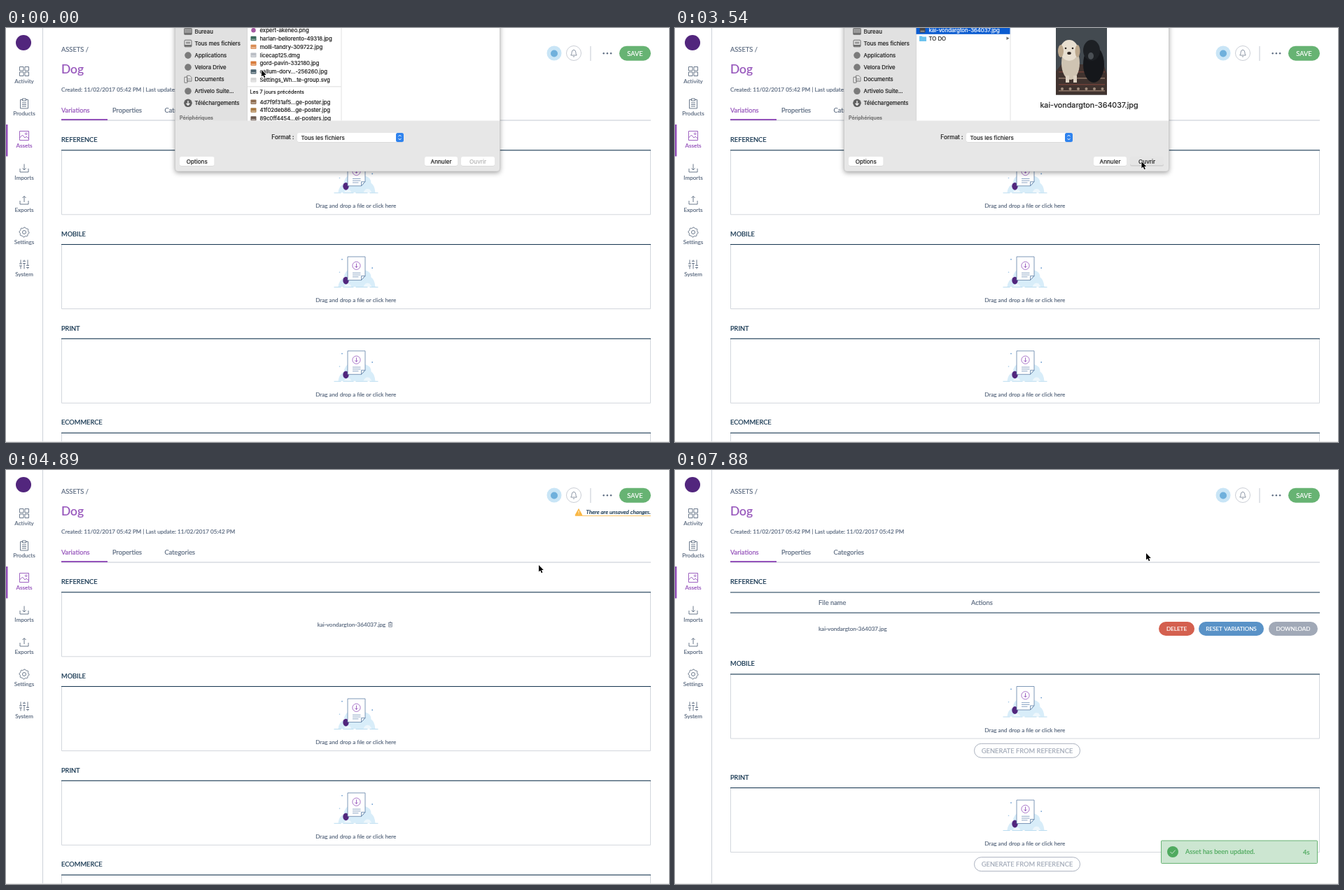
Write an HTML page with a canvas that moves like this. It is 947 px wide and 592 px high and loops after 8 s.

```html
<!DOCTYPE html>
<html lang="en">
<head>
<meta charset="utf-8">
<title>Asset upload</title>
<style>
html, body { margin: 0; width: 100%; height: 100%; overflow: hidden; background: #fff; }
canvas { display: block; width: 947px; height: 592px; }
</style>
</head>
<body>
<canvas id="stage"></canvas>
<script>
const W = 947, H = 592, LOOP = 8000;
const canvas = document.getElementById('stage');
const c = canvas.getContext('2d');
const dpr = window.devicePixelRatio || 1;
canvas.width = W * dpr;
canvas.height = H * dpr;

const NAVY = '#11324d', SLATE = '#5c6b80', PURPLE = '#9452ba', DEEP = '#52267d',
      GREEN = '#67b373', LINE = '#d3d7dd', ORANGE = '#f9b53f', GREY = '#a1a9b7',
      INK = '#1c1c1c';
const LATO = 'Lato, sans-serif', UI = 'Inter, sans-serif';
const FILE = 'kai-vondargton-364037.jpg';

// Cursor moves: start, time per step, steps, target x, target y
const MOVES = [
  [150, 172.5, 5, 309.5, 8],
  [1290, 150, 6, 430, 3],
  [2490, 150, 1, 463, 15],
  [2640, 150, 5, 678, 190],
  [3390, 150, 3, 665, 191],
  [4890, 150, 1, 761, 136],
  [5070, 150, 6, 893, 40],
  [7410, 156, 4, 673, 119]
];

function cursorAt(t) {
  let x = 365, y = 60;
  for (const [start, gap, n, tx, ty] of MOVES) {
    if (t < start) break;
    const p = Math.min(n, Math.floor((t - start) / gap) + 1) / n;
    const e = p * (2 - p);
    x += (tx - x) * e;
    y += (ty - y) * e;
  }
  return [x, y];
}

// Drawing helpers
function text(s, x, y, size, color, align = 'left', family = LATO, style = '') {
  c.font = `${style} ${size}px ${family}`;
  c.textAlign = align;
  c.textBaseline = 'alphabetic';
  c.fillStyle = c.strokeStyle = color;
  c.lineWidth = 0.2;
  c.lineJoin = 'round';
  c.fillText(s, x, y + size * 0.36);
  c.strokeText(s, x, y + size * 0.36); // slightly heavier, like desktop font smoothing
}
function rect(x, y, w, h, color) {
  c.fillStyle = color;
  c.fillRect(x, y, w, h);
}
function paint(fill, stroke, width = 1) {
  if (fill) { c.fillStyle = fill; c.fill(); }
  if (stroke) { c.strokeStyle = stroke; c.lineWidth = width; c.stroke(); }
}
function round(x, y, w, h, r, fill, stroke, width) {
  c.beginPath();
  c.roundRect(x, y, w, h, r);
  paint(fill, stroke, width);
}
function ellipse(x, y, rx, ry, fill, stroke, width) {
  c.beginPath();
  c.ellipse(x, y, rx, ry, 0, 0, Math.PI * 2);
  paint(fill, stroke, width);
}
const circle = (x, y, r, fill, stroke, width) => ellipse(x, y, r, r, fill, stroke, width);
function path(d, fill, stroke, width) {
  const p = new Path2D(d);
  if (fill) { c.fillStyle = fill; c.fill(p); }
  if (stroke) { c.strokeStyle = stroke; c.lineWidth = width || 1; c.stroke(p); }
}
function at(x, y, draw) {
  c.save();
  c.translate(x, y);
  draw();
  c.restore();
}

// Sidebar
const NAV = [
  ['Activity', col => {
    for (const x of [-6.5, 1]) for (const y of [-6.5, 1]) c.strokeRect(x, y, 5.5, 5.5);
  }],
  ['Products', col => {
    path('M-2.5-5.5H-5.5V7H5.5V-5.5H2.5M-2.5-7H2.5V-4H-2.5ZM-3-1H3M-3 1.5H3M-3 4H3', null, col, .9);
  }],
  ['Assets', col => {
    c.strokeRect(-6.5, -6.5, 13, 13);
    path('M-6.5 3L-2.5-1L1 3L3 1.2L6.5 4', null, col, .9);
    circle(2.7, -2.7, 1.3, null, col, .9);
  }],
  ['Imports', col => path('M-6 1V6H6V1M0-5.5V3M-2.5 .5L0 3L2.5 .5', null, col, .9)],
  ['Exports', col => path('M-6 1V6H6V1M0 3V-5.5M-2.5-3L0-5.5L2.5-3', null, col, .9)],
  ['Settings', col => {
    c.beginPath();
    for (let i = 0; i <= 32; i++) {
      const a = i * Math.PI / 16, r = i % 4 < 2 ? 7 : 6;
      c.lineTo(r * Math.cos(a), r * Math.sin(a));
    }
    paint(null, col, .9);
    circle(0, 0, 2.5, null, col, .9);
  }],
  ['System', col => path('M-5-6.5V-1M-5 2V6.5M0-6.5V-4.5M0-1.5V6.5M5-6.5V1.5M5 4.5V6.5M-7-1H-3M-7 2H-3M-2-4.5H2M-2-1.5H2M3 1.5H7M3 4.5H7', null, col, .9)]
];

function sidebar() {
  rect(52, 0, 1, 591, '#cdd2d9');
  circle(25, 21, 11, DEEP);
  rect(0, 138, 2.5, 45.5, PURPLE);
  NAV.forEach(([label, icon], i) => {
    const col = label === 'Assets' ? PURPLE : SLATE, y = 62 + i * 46;
    at(26, y, () => {
      c.strokeStyle = col;
      c.lineWidth = .9;
      icon(col);
    });
    text(label, 26, y + 14, 8.1, col, 'center');
  });
}

function header(unsaved) {
  text('ASSETS /', 79, 31, 9.3, SLATE);
  text('Dog', 79, 59, 17.4, PURPLE);
  const date = '11/02/2017 05:42 PM';
  text(`Created: ${date} | Last update: ${date}`, 79, 88.5, 8.1, SLATE);
  rect(79, 131.5, 842, 1, '#c4c9d1');
  rect(79, 130, 66, 2, PURPLE);
  text('Variations', 79, 117.5, 9.3, PURPLE);
  text('Properties', 152, 117.5, 9.3, SLATE);
  text('Categories', 226.5, 117.5, 9.3, SLATE);

  circle(783, 36, 10.5, '#c9e5f6');
  circle(783, 36.5, 5, '#6fb0dc');
  circle(811, 36, 10.5, '#fff', '#c4c9d1', .9);
  path('M806.8 39H815.2Q813.8 37.5 813.8 34.5Q813.5 31.5 811 31.3Q808.5 31.5 808.2 34.5Q808.2 37.5 806.8 39ZM809.8 40.5Q811 42 812.2 40.5', null, SLATE, .7);
  rect(834.5, 26, 1, 21, '#c4c9d1');
  for (let i = 0; i < 3; i++) circle(853.7 + i * 5.2, 36.3, 1.2, SLATE);
  pill('SAVE', 876, 25.7, 45, 21, GREEN, 9.3);

  if (unsaved) {
    path('M818 55.5L823 64.5H813Z', ORANGE, ORANGE, .8);
    rect(817.6, 58.3, .9, 3, '#fff');
    rect(817.6, 62.3, .9, .9, '#fff');
    text('There are unsaved changes.', 921, 60, 8.1, NAVY, 'right', LATO, 'italic');
    rect(813, 65, 108, .8, ORANGE);
  }
}

function pill(label, x, y, w, h, color, size) {
  round(x, y, w, h, h / 2, color);
  text(label, x + w / 2, y + h / 2, size, '#fff', 'center');
}

// Drop zones, positioned by the top rule
function section(title, y) {
  text(title, 79, y - 15, 9.3, NAVY);
  rect(79, y - .5, 842, 1, NAVY);
}
function frameBox(y) {
  c.strokeStyle = LINE;
  c.lineWidth = 1;
  c.strokeRect(79.5, y, 841, 92);
}
function dropZone(title, y) {
  frameBox(y);
  section(title, y);
  at(500.5, y, () => {
    path('M-26 60.5Q-25 51-18 48Q-17 38-9 35Q5 30 13 37Q21 39 21 47Q26 50 27 60.5Z', '#d8edf9');
    path('M-18 60.5Q-15 55-9 57L-7 60.5ZM10 60.5Q13 53 19 56L22 60.5Z', '#eef7fc');
    path('M-32 61H-22M-19 61H-4M-1 61H16M19 61H31', null, '#a9d3ec', .8);
    ellipse(-15, 51.5, 4.2, 5.4, DEEP);
    path('M-12.5 17.5H12.5V45L7 51H-12.5Z', '#fff', '#5f7fa6', .8);
    path('M12.5 45H7V51Z', '#eef7fc', '#5f7fa6', .8);
    circle(0, 30.3, 5.6, null, PURPLE, .8);
    path('M0 27V33M-2 31L0 33L2 31', null, PURPLE, .9);
    path('M-5.5 40.7H6M-5.5 43.5H6M-5.5 46.3H3', null, '#6f8fb5', .8);
    circle(-20.5, 21.3, .9, '#6a9cd0');
    circle(22.7, 33.6, .9, '#6a9cd0');
    circle(-24, 39.7, .8, '#9cc4e4');
  });
  text('Drag and drop a file or click here', 499.8, y + 79.7, 8.1, SLATE, 'center');
}
function generateButton(y) {
  round(427.5, y, 151, 20, 10, '#fff', GREY, .9);
  text('GENERATE FROM REFERENCE', 503, y + 10, 9.3, GREY, 'center');
}

function emptyPage(uploaded) {
  ['REFERENCE', 'MOBILE', 'PRINT', 'ECOMMERCE'].forEach((title, i) => {
    const y = 174.8 + i * 134.75;
    if (i || !uploaded) return dropZone(title, y);
    frameBox(y);
    section(title, y);
    text(FILE, 493.5, 221, 8.1, SLATE, 'center');
    path('M546 218.5H552M548 218.3V217.4H550V218.3M546.7 218.5V224.3H551.3V218.5M548.2 220V223M549.8 220V223', null, SLATE, .7);
  });
}

function savedPage() {
  section('REFERENCE', 175);
  text('File name', 205, 189.5, 9.3, SLATE);
  text('Actions', 423, 189.5, 9.3, SLATE);
  rect(79, 203.7, 842, 1, NAVY);
  text(FILE, 205, 227, 8.1, SLATE);
  pill('DELETE', 691, 217, 51, 20, '#d4604f', 8.1);
  pill('RESET VARIATIONS', 748, 217, 93, 20, '#5992c7', 8.1);
  pill('DOWNLOAD', 848, 217, 70, 20, GREY, 8.1);
  dropZone('MOBILE', 292);
  generateButton(391.3);
  dropZone('PRINT', 454.5);
  generateButton(553.7);
}

function toast(dx, left) {
  at(dx, 0, () => {
    round(694.5, 530, 223, 32.5, 1, '#cce6d1', '#67b373', 1);
    circle(711, 546, 8, '#4faa5f');
    path('M707.5 546L710 548.6L714.6 543.6', null, '#cce6d1', 1);
    text('Asset has been updated.', 729, 546, 9.3, '#4faa5f');
    text(left + 's', 897, 546.5, 9.3, '#4faa5f');
  });
}

// File chooser
const PLACES = ['Bureau', 'Tous mes fichiers', 'Applications', 'Velora Drive', 'Documents', 'Artivelo Suite...', 'Téléchargements'];
const RECENT = [
  ['expert-akeneo.png', '#a458a0'], ['harlan-bellorento-49318.jpg', '#3c6b5c'],
  ['molli-tandry-309722.jpg', '#d98d55'], ['licecap125.dmg', '#b9bdc4'],
  ['gord-pavin-332180.jpg', '#d87b3a'], ['callum-dorv...-256260.jpg', '#49606c'],
  ['Settings_Wh...te-group.svg', '#d5d5d5']
];
const OLDER = [
  ['4d7f9f31af5...ge-poster.jpg', '#8d6b4d'], ['41f02deb86...ge-poster.jpg', '#a87a43'],
  ['89c0ff4454...el-posters.jpg', '#6c5a50']
];

function placeIcon(i, y) {
  const col = '#6e6e6e';
  at(260, y, () => {
    if (i === 0) {
      round(-5.5, -4.5, 11, 9, 1, '#9a9a9a', col, .8);
      rect(-5, 2, 10, 2, col);
    } else if (i === 1) {
      round(-5, -4.8, 10, 9.6, 1, null, col, 1);
      rect(-3, -2.5, 6, 3, '#999');
      rect(-5, 2, 10, 2.5, col);
    } else if (i === 4) {
      path('M-5-3H-1V5H-5ZM-1.5-5H2.5L5-2.5V3H-1.5Z', '#ececec', col, .9);
      path('M0-1H3.5M0 1H3.5', null, col, .7);
    } else if (i === 6) {
      circle(0, 0, 5.8, '#606060');
      path('M0-3.2V2.5M-2.4 .4L0 3L2.4 .4', null, '#eee', 1.4);
    } else {
      circle(0, 0, 4.8, '#7b7b7b');
    }
  });
}

function fileRow(name, y, color, ink = INK) {
  if (name.endsWith('.png')) {
    circle(353.5, y, 3.2, color);
  } else {
    round(349.5, y - 3.2, 8, 6.4, .8, color);
    rect(350.5, y + .6, 6, 1.6, 'rgba(255,255,255,.45)');
  }
  text(name, 362.5, y, 7.8, ink, 'left', UI);
}

function photo() {
  c.save();
  c.beginPath();
  c.rect(544, -20, 73, 115.5);
  c.clip();
  rect(544, -20, 73, 116, '#434a50');
  path('M544 96V62L552 52H612L617 66V96Z', '#40332f');
  for (let i = 0; i < 4; i++) {
    rect(548, 62 + i * 9, 66, 1.6, i % 2 ? '#8a7364' : '#6b4038');
  }
  for (let i = 0; i < 6; i++) circle(553 + i * 11.5, 87, 2, '#a38f80');
  ellipse(565, 50, 13, 24, '#cfc4b2');
  ellipse(563, 32, 13, 15, '#e8dfd0');
  ellipse(551, 33, 4, 9, '#bda98e');
  ellipse(575, 33, 3.5, 9, '#bda98e');
  circle(558, 29, 1.3, '#2e2724');
  circle(568, 29, 1.3, '#2e2724');
  ellipse(563, 36, 2.8, 2, '#2e2724');
  ellipse(598, 52, 15, 26, '#15171b');
  ellipse(595, 32, 12, 15, '#1d2024');
  ellipse(594, 40, 4, 5, '#4a4f54');
  rect(558, 68, 5, 10, '#ddd2c2');
  rect(569, 68, 5, 10, '#ddd2c2');
  c.restore();
}

function button(label, x, w, pressed, ink = INK) {
  if (pressed) {
    round(x, 184.7, w, 13, 2.5, '#d2d2d2');
    round(x, 183.5, w, 12.5, 2.5, '#e5e5e5');
  } else {
    round(x, 184.6, w, 13, 2.5, '#cfcfcf');
    round(x, 184, w, 13, 2.5, '#fff');
  }
  text(label, x + w / 2, 190.8, 8.2, ink, 'center', UI);
}

function dialog(t) {
  const chosen = t >= 2340;
  c.save();
  c.shadowColor = 'rgba(0,0,0,.38)';
  c.shadowBlur = 7 * dpr;
  c.shadowOffsetY = 2 * dpr;
  round(241.5, -60, 464, 265, 4, '#e7e7e7');
  c.restore();
  round(241.5, -60, 464, 265, 4, null, '#bdbdbd', .5);

  c.save();
  c.beginPath();
  c.rect(242, -60, 463, 192.5);
  c.clip();
  rect(242, -60, 102.5, 193, '#e1e1e1');
  rect(344.5, -60, 361, 193, '#fff');
  rect(344, -60, .8, 193, '#d0d0d0');
  rect(478.5, -60, 1, 193, '#e2e2e2');
  PLACES.forEach((name, i) => {
    const y = 5 + i * 17.05;
    placeIcon(i, y);
    text(name, 269.5, y, 7.85, INK, 'left', UI);
  });
  text('Périphériques', 248, 128.5, 7.1, '#707070', 'left', UI, '600');

  if (t < 1140) {
    RECENT.forEach(([name, col], i) => fileRow(name, 3.2 + i * 11.85, col));
    rect(345, 83.5, 133.5, .8, '#d4d4d4');
    text('Les 7 jours précédents', 348.5, 91.5, 7.2, INK, 'left', UI);
    OLDER.forEach(([name, col], i) => fileRow(name, 105.7 + i * 11.85, col));
  } else {
    if (chosen) rect(344.5, -3, 134, 11.8, '#0a5bd0');
    fileRow(FILE, 3.2, '#4b4745', chosen ? '#fff' : INK);
    path('M349 11.5H352.5L353.5 12.5H359V19H349Z', '#6cc3ee');
    text('TO DO', 362.5, 15, 7.8, INK, 'left', UI);
    path('M473.5 12.5L477.5 14.8L473.5 17.1Z', '#6a6a6a');
    if (chosen) {
      photo();
      text(FILE, 591.5, 110.5, 10.8, INK, 'center', UI);
    }
  }
  c.restore();

  text('Format :', 411.5, 156.5, 8.3, INK, 'right', UI);
  round(416, 150.5, 152, 13, 2.5, '#d2d2d2');
  round(416, 150, 152, 13, 2.5, '#fff');
  text('Tous les fichiers', 421.5, 156.8, 8.1, INK, 'left', UI);
  round(557, 150, 11, 13, 2.5, '#2f83ee');
  path('M560.5 155.2L562.5 153L564.5 155.2M560.5 157.8L562.5 160L564.5 157.8', null, '#fff', 1);
  button('Options', 248, 49.5);
  button('Annuler', 598, 47);
  button('Ouvrir', 650, 48, t >= 3390, chosen ? INK : '#b3b3b3');
}

// Pointers
function pointer(x, y) {
  const overSave = x > 876 && x < 921 && y > 26 && y < 47;
  at(x, y, () => {
    c.lineJoin = 'round';
    if (overSave) {
      path('M-1.3 1Q-.3-.8 .8 1V4.3L2.4 4.1L5 4.8Q6.3 5.2 6.1 7L5 11.5H-.2L-3.6 7.2Q-3.6 5.6-1.3 7Z', '#fff', '#111', .9);
      path('M2.2 7V9.5M3.8 7V9.5M.6 7V9.5', null, '#111', .5);
    } else {
      const arrow = 'M0 0V9.6L2.2 7.6L3.8 11.3L5.4 10.6L3.8 7H6.8Z';
      path(arrow, null, '#fff', 1.2);
      path(arrow, '#000');
    }
  });
}

function draw(t) {
  c.setTransform(dpr, 0, 0, dpr, 0, 0);
  rect(0, 0, W, H, '#fff');
  const uploaded = t >= 4140, saved = t >= 6450;
  sidebar();
  header(uploaded && !saved);
  if (saved) savedPage();
  else emptyPage(uploaded);
  rect(0, 591, W, 1, '#e6e6e6');

  if (t < 3840) at(0, t < 3690 ? 0 : -53.5, () => dialog(t));
  if (t >= 5970 && !saved) rect(0, 0, W, H, 'rgba(255,255,255,.5)');
  if (t >= 6870) toast(t < 7020 ? 110 : 0, t < 7880 ? 5 : 4);
  pointer(...cursorAt(t));
}

const begin = performance.now();
function tick() {
  draw((performance.now() - begin) % LOOP);
  requestAnimationFrame(tick);
}
tick();
</script>
</body>
</html>
```
